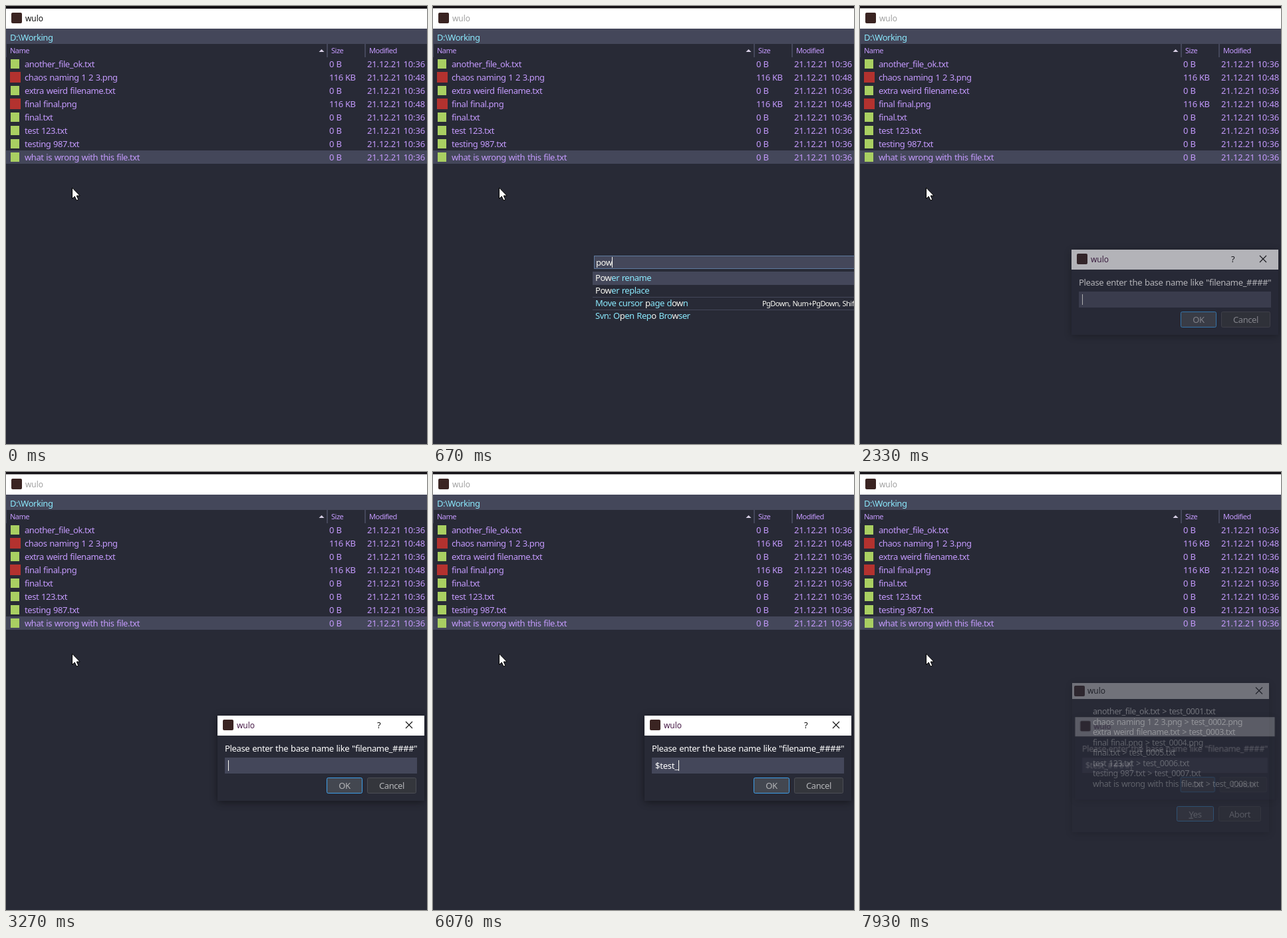
These frames come from a looping animation (633 by 658 pixels, 8000 ms). An HTML page:

```html
<!DOCTYPE html>
<html lang="en">
<head>
<meta charset="utf-8">
<title>File manager</title>
<style>
  html, body { margin: 0; width: 100%; height: 100%; overflow: hidden; background: #282a36; }
  svg { display: block; width: 633px; height: 658px; }
  text { font: 13px "Noto Sans", "Open Sans", sans-serif; letter-spacing: -.43px; word-spacing: .8px; fill: #c49afd; white-space: pre; }
  .head { font-size: 11px; letter-spacing: -.5px; }
  .size { letter-spacing: -.6px; }
  .date { letter-spacing: -.14px; }
  .title { font: 12px "Open Sans", "Noto Sans", sans-serif; letter-spacing: 0; fill: #000; }
  .path, .cmd { fill: #8be9fd; letter-spacing: -.48px; }
  .hit { fill: #f8f8f2; }
  .query { fill: #f8f8f2; letter-spacing: -.4px; }
  .keys { font-size: 11px; letter-spacing: -.55px; fill: #f8f8f2; }
  .label { fill: #fff; letter-spacing: -.34px; }
  .entry { fill: #fff; letter-spacing: -.24px; }
  .hash { letter-spacing: .6px; }
  .button { fill: #b4b5b8; text-anchor: middle; }
  .preview { font-size: 12.5px; fill: #fff; }
  .window { filter: drop-shadow(0 2px 6px rgba(0, 0, 0, .45)); }
  #ask { transform-origin: 472px 429px; }
</style>
</head>
<body>
<svg id="stage" viewBox="0 0 633 658"></svg>
<script>
const LOOP = 8000;
const BAR = '#44475a', BACK = '#282a36', APP = 'wulo';

const files = [
  ['another_file_ok.txt', 'test_0001.txt'],
  ['chaos naming 1 2 3.png', 'test_0002.png'],
  ['extra weird filename.txt', 'test_0003.txt'],
  ['final final.png', 'test_0004.png'],
  ['final.txt', 'test_0005.txt'],
  ['test 123.txt', 'test_0006.txt'],
  ['testing 987.txt', 'test_0007.txt'],
  ['what is wrong with this file.txt', 'test_0008.txt']
];
const commands = [
  'Power rename', 'Power replace', 'Move cursor page down', 'Svn: Open Repo Browser',
  'Copy paths to clipboard', 'Compare directories', 'Copy to clipboard',
  'Open with editor', 'Import selection', 'Export selection'
];

// One entry per keystroke: time, character, caret position after it
const search = [[400, 'p', 252], [530, 'o', 259], [670, 'w', 269], [800, 'e', 276], [1000, 'r', 281]];
const entry = [
  [4530, '$', 341], [5400, 't', 346], [5600, 'e', 353], [5670, 's', 359], [5800, 't', 363],
  [6070, '_', 369], [6800, '#', 378], [7000, '#', 387], [7200, '#', 396], [7400, '#', 405]
];

const rect = (x, y, w, h, fill, extra = '') =>
  `<rect x="${x}" y="${y}" width="${w}" height="${h}" fill="${fill}" ${extra}/>`;
const text = (x, y, cls, content, extra = '') =>
  `<text x="${x}" y="${y}" class="${cls}" ${extra}>${content}</text>`;
const appIcon = (x, y) => rect(x, y, 16, 16, '#3a2422', 'rx="2"');
const cross = (x, y, r) =>
  `<path d="M${x - r} ${y - r}l${2 * r} ${2 * r}m0 ${-2 * r}l${-2 * r} ${2 * r}" stroke="#111" stroke-width="1.1"/>`;
const button = (x, y, w, h, label, active) =>
  rect(x + .5, y + .5, w - 1, h - 1, active ? '#434750' : '#34363c',
    `rx="2" stroke="${active ? '#3d9ee9' : '#4c4e55'}"`) +
  text(x + w / 2, y + h / 2 + 5, 'button', label);
const typed = (x, y, cls, keys, name) => text(x, y, cls, keys.map(([, c], i) =>
  `<tspan id="${name}${i}" class="${c === '#' ? 'hash' : ''}">${c}</tspan>`).join(''));

function fileRow([name], i) {
  const y = 77 + 20 * i, image = name.endsWith('png');
  return (i === 7 ? rect(0, y, 633, 20, BAR) : '') +
    (image ? rect(6, y + 2, 16, 16, '#b3322f') : rect(7, y + 3, 13, 14, '#a9cf62')) +
    text(28, y + 15, '', name) +
    text(486, y + 15, 'size', image ? '116 KB' : '0 B') +
    text(543, y + 15, 'date', image ? '21.12.21 10:48' : '21.12.21 10:36');
}

// Marks the letters of the query in order; null when they do not all occur
function mark(name, query) {
  let k = 0;
  const out = [...name].map(c => c.toLowerCase() === query[k] ? (k++, `<tspan class="hit">${c}</tspan>`) : c);
  return k === query.length ? out.join('') : null;
}

function commandList(query, id) {
  const found = commands.filter(c => mark(c, query) !== null).slice(0, query ? 10 : 3);
  const rows = found.map((name, i) => {
    const y = 399 + 19 * i;
    return (i > 1 ? rect(240, y, 393, 1, BAR) : '') +
      text(244, y + 14, 'cmd', mark(name, query)) +
      (name.startsWith('Move') ? text(495, y + 14, 'keys', 'PgDown, Num+PgDown, Shift+PgDown') : '');
  });
  return `<g id="${id}">${rows.join('')}</g>`;
}

const queries = ['', 'p', 'po', 'pow', 'powe', 'power'];

document.getElementById('stage').innerHTML =
  rect(0, 0, 633, 658, BACK) + rect(0, 0, 633, 3, '#141116') +
  rect(0, 3, 633, 1, '#141116', 'id="border"') + rect(0, 4, 633, 30, '#fff') +
  appIcon(8, 10) + text(29, 23, 'title', APP, 'id="title"') +
  rect(0, 34, 633, 23, BAR) + text(6, 52, 'path', 'D:\\Working') +
  [0, 482, 539].map(x => rect(x, 57, x ? 2 : 1, 20, BAR)).join('') +
  text(6, 71, 'head', 'Name') + text(489, 71, 'head', 'Size') + text(546, 71, 'head', 'Modified') +
  '<path d="M470.5 69l4-4 4 4z" fill="#d8d0e6"/>' +
  files.map(fileRow).join('') +
  `<g id="palette">
    ${rect(240, 375, 393, 22, BACK)}
    ${rect(242.5, 375.5, 400, 19, BAR, 'stroke="#5f7a9f"')}
    ${rect(240, 399, 393, 20, BAR)}
    ${typed(245, 390, 'query', search, 'search')}
    ${rect(0, 377, 1, 16, '#f8f8f2', 'id="searchCaret"')}
    ${queries.map((q, i) => commandList(q, 'list' + i)).join('')}
  </g>
  <g id="confirm" class="window">
    ${rect(319, 317, 296, 224, BACK)}
    ${rect(319, 317, 296, 24, '#fff')}
    ${appIcon(322, 321)}
    ${text(342, 333, 'title', APP)}
    ${cross(600, 328.5, 5)}
    ${files.map(([a, b], i) => text(350, 364 + 15.5 * i, 'preview', `${a} &gt; ${b}`)).join('')}
    ${button(476, 502, 56, 23, '<tspan text-decoration="underline">Y</tspan>es', true)}
    ${button(539, 502, 64, 23, 'Abort')}
  </g>
  <g id="ask" class="window">
    ${rect(318, 366, 311, 128, BACK)}
    ${rect(318, 366, 311, 30, '#fff')}
    ${appIcon(326, 372)}
    ${text(347, 385, 'title', APP, 'style="fill:#3a0a3a"')}
    <g id="controls">
      ${text(558, 385, 'title', '?', 'style="font-size:13px"')}
      ${cross(606, 380, 5)}
    </g>
    ${text(329, 420, 'label', 'Please enter the base name like "filename_####"')}
    ${rect(329, 429, 289, 24, BAR)}
    ${typed(334, 446, 'entry', entry, 'entry')}
    ${rect(0, 433, 1, 16, '#f8f8f2', 'id="entryCaret"')}
    ${button(482, 459, 54, 24, 'OK', true)}
    ${button(543, 459, 74, 24, 'Cancel')}
  </g>
  <path d="M99.5 273v16.5l3.8-3.5 2.7 6 2.8-1.2-2.6-5.8h5z" fill="#fff" stroke="#000"/>`;

// Plays a property as held values from a table of [time, value]
function cue(id, prop, ...steps) {
  const frames = [...steps, [LOOP, steps.at(-1)[1]]].map(([t, value]) =>
    ({ offset: t / LOOP, [prop]: value, easing: 'steps(1, end)' }));
  document.getElementById(id).animate(frames, { duration: LOOP, iterations: Infinity });
}
const show = (id, from, to) => cue(id, 'opacity', [0, 0], [from, 1], [to, 0]);

function typing(name, startX, keys) {
  keys.forEach(([t], i) => cue(name + i, 'fillOpacity', [0, 0], [t, 1]));
  cue(name + 'Caret', 'transform', [0, `translate(${startX}px)`],
    ...keys.map(([t, , x]) => [t, `translate(${x}px)`]));
}

// The main window changes focus at these times, starting focused
const focus = (id, on, off) =>
  cue(id, 'fill', ...[0, 70, 2070, 2130, 7800, 7870].map((t, i) => [t, i % 2 ? off : on]));
focus('title', '#000', '#999');
focus('border', '#141116', '#999');

show('palette', 130, 2070);
queries.forEach((q, i) => show('list' + i, i ? search[i - 1][0] : 130, i < 5 ? search[i][0] : 2070));
typing('search', 245, search);
cue('searchCaret', 'opacity', [0, 1], [1600, 0]);

cue('ask', 'opacity', [0, 0], [2270, .3], [2330, .65], [2400, .9], [2470, 1], [7800, .9], [7870, .6], [7930, .24]);
cue('ask', 'transform', [0, 'scale(1)'], [7800, 'scale(.99)'], [7870, 'scale(.98)'], [7930, 'scale(.965)']);
cue('controls', 'opacity', [0, 1], [7870, 0]);
typing('entry', 334, entry);
cue('entryCaret', 'opacity', [0, 1], [2730, 0], [3270, 1], [3800, 0], [4330, 1], [5200, 0], [5400, 1], [6730, 0], [6800, 1]);

cue('confirm', 'opacity', [0, 0], [7930, .34]);
</script>
</body>
</html>
```
